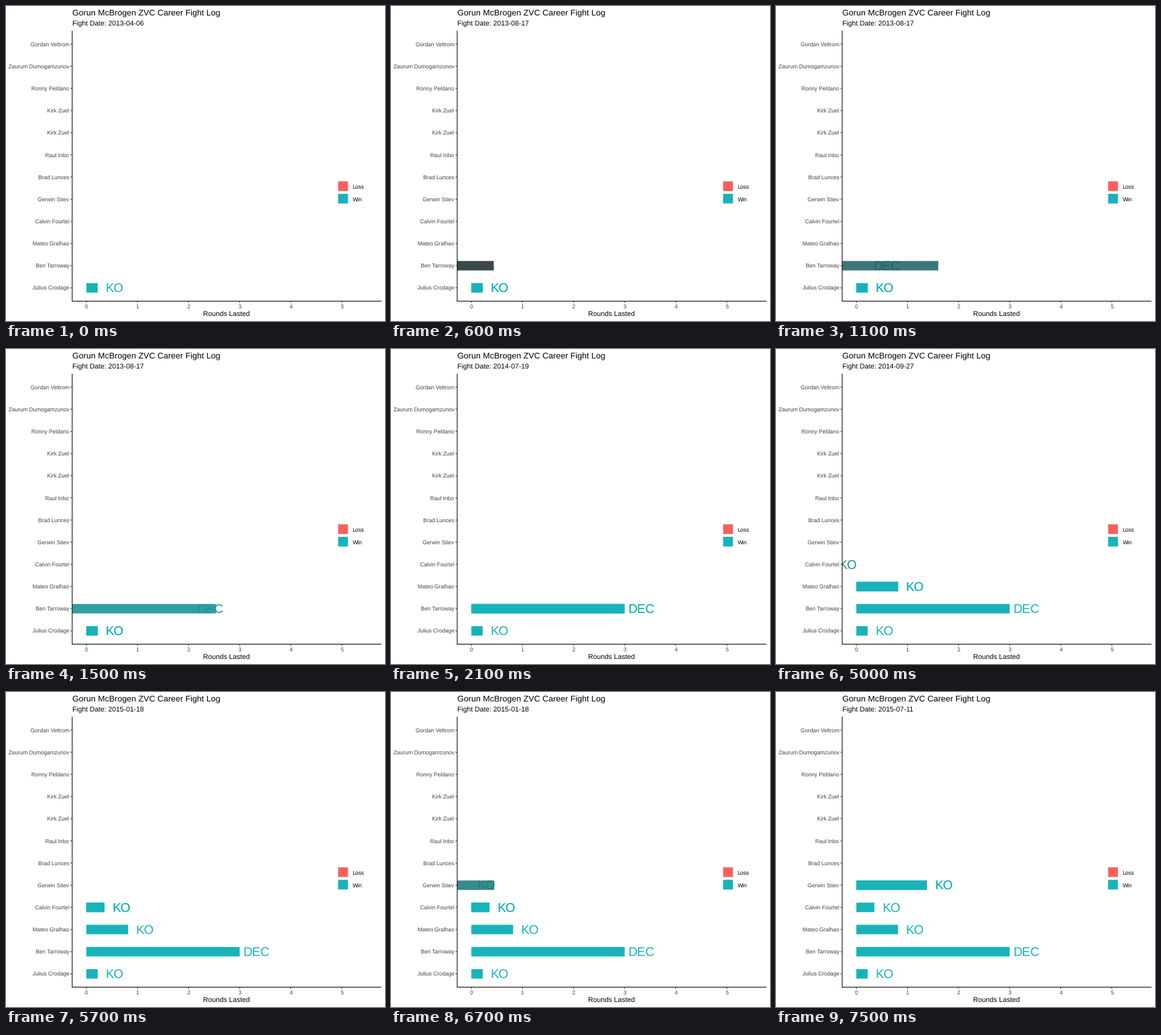
These frames come from a looping animation (600x500 px, 8 s). A matplotlib script:

```python
import numpy as np
import matplotlib.pyplot as plt
from matplotlib.animation import FuncAnimation
from matplotlib.patches import Rectangle

plt.rcParams["font.family"] = "Liberation Sans"
plt.rcParams["text.hinting"] = "none"

W, H, DPI = 600, 500, 72
WIN, LOSS = "#18B3B8", "#F9605C"
AXIS_TEXT = "#424242"
PANEL = (104.8, 39.2, 594.5, 468.5)  # left, top, right, bottom
ORIGIN, UNIT = 127.2, 80.9           # x of round 0, pixels per round
ROW0, ROW_STEP = 447.4, 35.18
BAR_H, LABEL_GAP = 15, 0.33
PERIOD, MOVE = 18, 14                # frames per fight, frames of its entry
BAR_START = -3.26

NAMES = ["Julius Crodage", "Ben Tarroway", "Mateo Gralhao", "Calvin Fourtel",
         "Gerwin Stiev", "Brad Lunces", "Raul Inbo", "Kirk Zuel", "Kirk Zuel",
         "Ronny Peldano", "Zaurum Dumogamzunov", "Gordan Veltrom"]
DATES = ["2013-04-06", "2013-08-17", "2014-07-19",
         "2014-09-27", "2015-01-18", "2015-07-11"]
# rounds lasted, result, where the result label flies in from
FIGHTS = [(0.223, "KO", -3.26), (3.0, "DEC", -3.05), (0.817, "KO", -3.26),
          (0.353, "KO", -3.26), (1.38, "KO", -3.26)]

RGB_XYZ = np.array([[0.4124, 0.3576, 0.1805],
                    [0.2126, 0.7152, 0.0722],
                    [0.0193, 0.1192, 0.9505]])
WHITE = RGB_XYZ.sum(axis=1)
XYZ_LAB = np.array([[0, 116, 0], [500, -500, 0], [0, 200, -200]])


def to_lab(rgb):
    rgb = np.asarray(rgb, float)
    lin = np.where(rgb > 0.04045, ((rgb + 0.055) / 1.055) ** 2.4, rgb / 12.92)
    t = RGB_XYZ @ lin / WHITE
    f = np.where(t > 0.008856, np.cbrt(t), 7.787 * t + 16 / 116)
    return XYZ_LAB @ f - [16, 0, 0]


def to_rgb(lab):
    fy = (lab[0] + 16) / 116
    f = np.array([fy + lab[1] / 500, fy, fy - lab[2] / 200])
    t = np.where(f > 0.2069, f ** 3, (f - 16 / 116) / 7.787)
    lin = np.clip(np.linalg.solve(RGB_XYZ, t * WHITE), 0, 1)
    return np.where(lin > 0.0031308, 1.055 * lin ** (1 / 2.4) - 0.055, 12.92 * lin)


WIN_LAB = to_lab(plt.matplotlib.colors.to_rgb(WIN))
BAR_DARK = to_lab([0.21, 0.18, 0.18])
TEXT_DARK = to_lab([0.0] * 3)


def fade(dark, p):
    return WIN if p >= 1 else tuple(np.clip(to_rgb(dark + (WIN_LAB - dark) * p), 0, 1))


def px(rounds):
    return ORIGIN + UNIT * rounds


def row_y(i):
    return ROW0 - ROW_STEP * i


fig = plt.figure(figsize=(W / DPI, H / DPI), dpi=DPI, facecolor="white")
ax = fig.add_axes([0, 0, 1, 1])
ax.set_xlim(0, W)
ax.set_ylim(H, 0)
ax.axis("off")


def write(x, y, s, size, color="black", ha="left", **kw):
    return ax.text(x, y, s, fontsize=size, color=color, ha=ha, va="baseline", **kw)


def line(xs, ys, color="black"):
    ax.plot(xs, ys, color=color, lw=1.07, solid_capstyle="butt", zorder=5, snap=False)


left, top, right, bottom = PANEL
line([left, left], [top, bottom + 0.5])
line([left - 0.5, right], [bottom, bottom])
for i, name in enumerate(NAMES):
    y = row_y(i)
    line([left - 2.75, left], [y, y], "#333333")
    write(100, y + 3.2, name, 8.8, AXIS_TEXT, "right")
for n in range(6):
    line([px(n)] * 2, [bottom, bottom + 2.75], "#333333")
    write(px(n), 480, str(n), 8.8, AXIS_TEXT, "center")

write(105, 15, "Gorun McBrogen ZVC Career Fight Log", 13.2)
subtitle = write(105, 32, "", 11)
write(349.5, 493, "Rounds Lasted", 11, ha="center")
for y, color, label in [(286, LOSS, "Loss"), (305.8, WIN, "Win")]:
    ax.add_patch(Rectangle((525.8, y - 7.7), 15.6, 15.4, fc=color, lw=0, snap=False))
    write(548.5, y + 3.7, label, 8.8)

clip = Rectangle((left, top), right - left, bottom - top, transform=ax.transData)


class Fight:
    def __init__(self, i):
        self.rounds, result, self.start = FIGHTS[i]
        y = row_y(i)
        self.bar = ax.add_patch(Rectangle((0, y - BAR_H / 2), UNIT * self.rounds,
                                          BAR_H, lw=0, zorder=2, snap=False))
        self.label = write(0, y + 7.5, result, 19.9, ha="center",
                           zorder=3, clip_on=True)
        for art in (self.bar, self.label):
            art.set_clip_path(clip)

    def show(self, visible, p=1.0):
        self.bar.set_visible(visible)
        self.label.set_visible(visible)
        if visible:
            end = self.rounds + LABEL_GAP
            self.bar.set_x(px(BAR_START * (1 - p)))
            self.bar.set_facecolor(fade(BAR_DARK, p))
            self.label.set_x(px(end + (self.start - end) * (1 - p)))
            self.label.set_color(fade(TEXT_DARK, p))


fights = [Fight(i) for i in range(len(FIGHTS))]
echoes = [Fight(i) for i in range(len(FIGHTS))]


def update(frame):
    stage, k = divmod(frame + 15, PERIOD)
    p = min(k / MOVE, 1)
    subtitle.set_text("Fight Date: " + DATES[stage])
    for i, (fight, echo) in enumerate(zip(fights, echoes)):
        fight.show(i <= stage, p if i == stage else 1)
        # the previous fight is drawn twice until the new one has landed
        echo.show(i == stage - 1 and k < MOVE)
    return []


anim = FuncAnimation(fig, update, frames=80, interval=100, repeat=True,
                     repeat_delay=0, init_func=lambda: update(0), blit=False)
plt.show()
```
